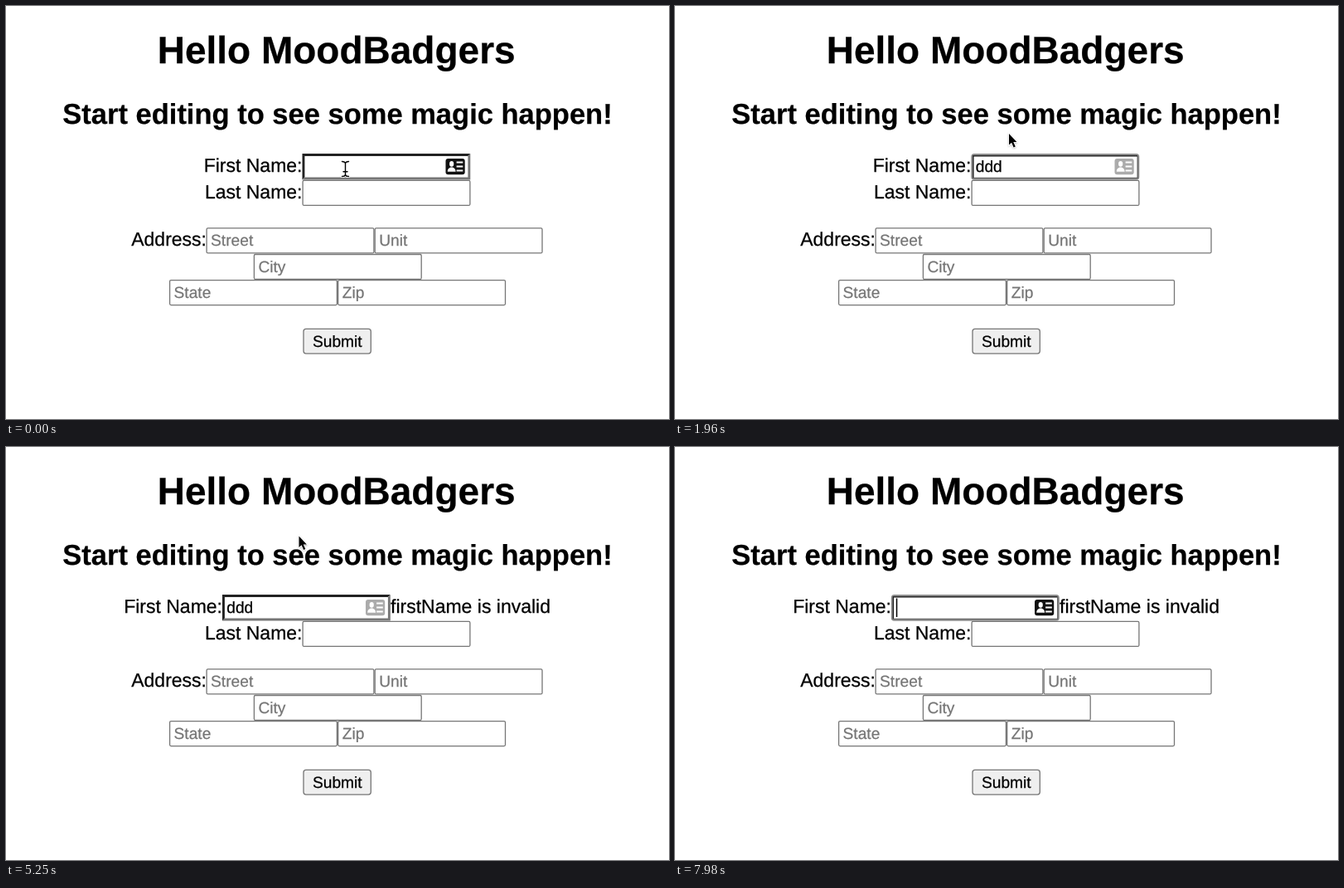
An HTML page that plays this animation: 800x498 px, repeating every 8000 ms.

```html
<!DOCTYPE html>
<html lang="en">
<head>
<meta charset="utf-8">
<title>Form demo</title>
<style>
  html, body { margin: 0; width: 100%; height: 100%; overflow: hidden; background: #fff; }
  svg { display: block; width: 100%; height: 100%; }
  text { font-family: "Liberation Sans", Arial, Helvetica, sans-serif; font-size: 23px; text-rendering: geometricPrecision; white-space: pre; stroke: #000; stroke-width: .25; }
  .mid { text-anchor: middle; }
  .end { text-anchor: end; }
  .h1 { font-size: 46px; font-weight: 700; }
  .h2 { font-size: 34.5px; font-weight: 700; }
  .small { font-size: 19.17px; }
  .hint { fill: #757575; stroke: #757575; }
  .menu text { font-family: Inter, Roboto, sans-serif; font-size: 14.6px; fill: #262626; stroke: none; }
  .menu .name { font-weight: 600; fill: #333; }
  .box { fill: #fff; stroke: #767676; stroke-width: 1.3; }
</style>
</head>
<body>
<svg viewBox="0 0 800 498" xmlns="http://www.w3.org/2000/svg">
  <defs>
    <filter id="shade" x="-20%" y="-20%" width="140%" height="140%">
      <feDropShadow dx="0" dy="1" stdDeviation="2" flood-opacity=".32"/>
    </filter>
    <filter id="soft" x="-50%" y="-50%" width="200%" height="200%">
      <feDropShadow dx="0" dy="1" stdDeviation="1" flood-opacity=".3"/>
    </filter>
    <path id="stem" d="M-4 -9Q-.6 -9 0 -7Q.6 -9 4 -9M0 -7V7M-4 9Q-.6 9 0 7Q.6 9 4 9M-2.5 3.2H2.5"/>
  </defs>
  <rect width="800" height="498" fill="#fff"/>
  <text class="h1" x="182.7" y="68.8">Hello MoodBadgers</text>
  <text class="h2 mid" x="400" y="142">Start editing to see some magic happen!</text>
  <text class="end" x="357.5" y="231.7">Last Name:</text>
  <text class="end" x="242" y="288.8">Address:</text>
  <g id="fields"></g>
  <rect class="box" x="359" y="389.4" width="81.3" height="29.7" rx="3" style="fill:#efefef"/>
  <text class="small mid" x="399.8" y="410.7">Submit</text>

  <g id="row">
    <text class="end" x="357.5" y="199.7">First Name:</text>
    <g id="inset">
      <path d="M357.5 178H560.3L557.4 180.9H360.4V206.6L357.5 209.5Z" fill="#222"/>
      <path d="M560.3 178V209.5H357.5L360.4 206.6H557.4V180.9Z" fill="#767676"/>
    </g>
    <g id="focus" fill="none">
      <rect x="358.6" y="179.4" width="200.4" height="29" rx="2.5" stroke="#8c8c8c" stroke-width="2.6"/>
      <path d="M359.9 207.5V180.7H558" stroke="#222" stroke-width="1.4"/>
      <path d="M360 207.4H558.2V181" stroke="#666" stroke-width="1.2"/>
    </g>
    <g id="icon">
      <rect x="530.5" y="184" width="23.2" height="19.2" rx="3"/>
      <g fill="#fff">
        <ellipse cx="537.7" cy="190.4" rx="2.6" ry="3.3"/>
        <path d="M532.8 199.8C532.8 196 535 195.6 536.6 194.6H538.8C540.4 195.6 542.6 196 542.6 199.8Z"/>
        <path d="M543.6 187.4H551.3V189.4H543.6ZM543.6 192.5H551.3V194.5H543.6ZM543.6 197.6H551.3V199.6H543.6Z"/>
      </g>
    </g>
    <text id="value" class="small" x="362.8" y="199.7"></text>
    <rect id="caret" y="182.5" width="1.5" height="22.5"/>
    <text id="error" x="560.5" y="199.7">firstName is invalid</text>
  </g>

  <g id="menu" class="menu">
    <rect x="357.5" y="211" width="220.5" height="129.7" fill="#fff" filter="url(#shade)"/>
    <path d="M357.5 296.5H578" stroke="#dcdcdc" stroke-width="1.2"/>
    <text class="name" x="368.8" y="246.5">Ravlen</text>
    <text x="368.8" y="271">427 Mosgrave Street, #615</text>
    <text x="368.8" y="324.6">Manage addresses...</text>
  </g>

  <circle id="ring" fill="#888" fill-opacity=".03" stroke="#909090" stroke-opacity=".55" stroke-width="2.8"/>
  <g id="beam" fill="none" stroke-linecap="round">
    <use href="#stem" stroke="#fff" stroke-width="3"/>
    <use href="#stem" stroke="#000" stroke-width="1.4"/>
  </g>
  <path id="arrow" d="M0 0V13.6L3.1 10.8L5.6 16.5L7.8 15.5L5.3 9.9H9.4Z" stroke="#fff" stroke-width="1.3" paint-order="stroke" filter="url(#soft)"/>
</svg>
<script>
const LOOP = 8000, STEP = 70;
const $ = id => document.getElementById(id);
const show = (id, on) => $(id).setAttribute("display", on ? "inline" : "none");
const within = (t, a, b) => t >= a && t < b;
const clamp = v => Math.min(1, Math.max(0, v));
const ease = v => v * v * (3 - 2 * v);

const fields = [
  [358.1, 210.4, ""], [242.1, 267.9, "Street"], [445.2, 267.9, "Unit"],
  [299.4, 299.5, "City"], [197.6, 330.6, "State"], [400.7, 330.6, "Zip"]
];
$("fields").innerHTML = fields.map(([x, y, hint]) =>
  `<rect class="box" x="${x}" y="${y}" width="201.8" height="30" rx="1.5"/>` +
  `<text class="small hint" x="${x + 5}" y="${y + 21.2}">${hint}</text>`).join("");

// Pointer legs: start, end, destination
const home = [409.5, 196.5];
const legs = [
  [1680, 1960, 403, 154],
  [2200, 2590, 237, 257],
  [4550, 4760, 353.5, 107.5],
  [6400, 6720, 300, 196]
];
const clicks = [630, 3430, 6930];
const keys = [1260, 1330, 1400];
const erases = [7840, 7910, 7980];

function pointer(t) {
  let [x, y] = home;
  for (const [a, b, tx, ty] of legs) {
    const k = ease(clamp((t - a) / (b - a)));
    x += (tx - x) * k;
    y += (ty - y) * k;
  }
  return [x, y];
}

function drawPointer(t) {
  const [x, y] = pointer(t);
  const hidden = within(t, keys[0], 1750) || t >= erases[0];
  const overField = y > 178 && y < 210 && x > 262;
  show("beam", !hidden && overField);
  show("arrow", !hidden && !overField);
  for (const id of ["beam", "arrow"]) $(id).setAttribute("transform", `translate(${x} ${y})`);

  const start = clicks.find(c => within(t, c, c + 350));
  show("ring", start !== undefined);
  if (start === undefined) return;
  const age = t - start;
  const grow = clamp((age + 70) / 140);
  const ring = $("ring");
  ring.setAttribute("cx", x);
  ring.setAttribute("cy", y);
  ring.setAttribute("r", 27 * (0.6 + 0.4 * grow));
  ring.setAttribute("opacity", Math.min(grow, clamp((350 - age) / 140)));
}

function drawField(t) {
  const count = keys.filter(k => t >= k).length - erases.filter(k => t >= k).length;
  const focused = within(t, 700, 3500) || t >= 7000;
  const invalid = t >= 3500;
  // The caret restarts its blink on focus and on typing
  const blink = t >= 7840 ? 7840 : t >= 7000 ? 7000 : t >= 1400 ? 1430 : t;
  const lit = t < blink || (t - blink) % 1000 < 500;

  $("row").setAttribute("transform", `translate(${invalid ? -96.5 : 0} 0)`);
  $("value").textContent = "d".repeat(count);
  $("caret").setAttribute("x", 363.3 + count * 10.66);
  $("icon").setAttribute("fill", within(t, 700, 7980) ? "#ababab" : "#111");
  show("caret", focused && lit);
  show("focus", focused);
  show("inset", !focused);
  show("error", invalid);
  show("menu", within(t, 770, keys[0]));
}

function frame(now) {
  const t = Math.floor((now % LOOP) / STEP) * STEP;
  drawField(t);
  drawPointer(t);
  requestAnimationFrame(frame);
}
frame(performance.now());
</script>
</body>
</html>
```
